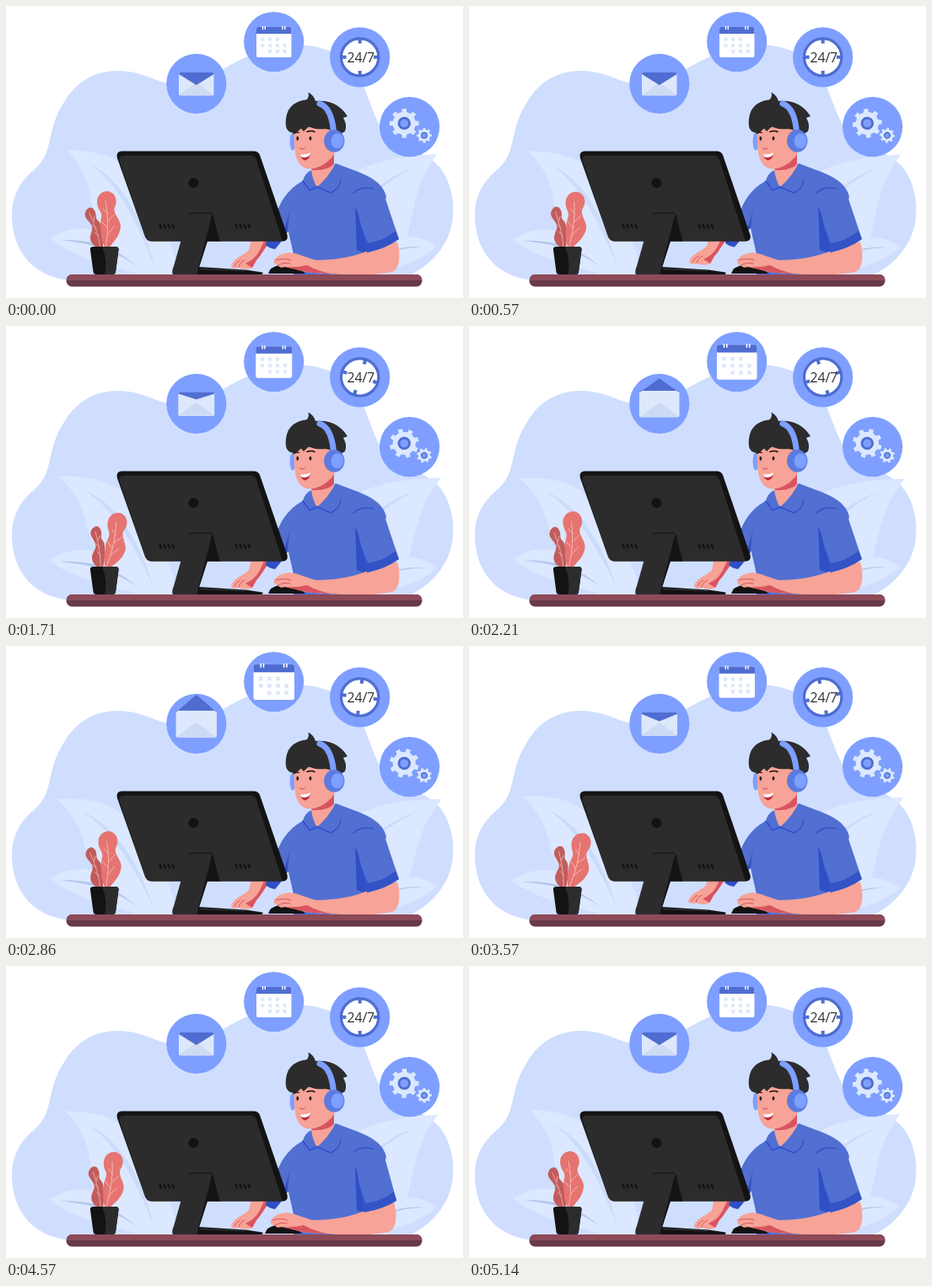
An HTML page for the animation above (5210 ms loop, 542 px wide and 347 px high).

```html
<!DOCTYPE html>
<html lang="en">
<head>
<meta charset="utf-8">
<style>
html, body { margin: 0; width: 100%; height: 100%; overflow: hidden; background: #fff }
svg { display: block; width: 100vw; height: 100vh }
.disc { fill: #7e9fff }
.pale { fill: #dbe8ff }
.blue { fill: #526fd2 }
.navy { fill: #2f4fc6 }
.skin { fill: #f7a397 }
.red { fill: #d9545f }
.dark { fill: #2c2c2c }
.black { fill: #131313 }
.line { fill: none; stroke-linecap: round; stroke-linejoin: round }
</style>
</head>
<body>
<svg viewBox="0 0 542 347">
  <path fill="#cfdeff" d="M75 326C40 322 9 300 7 252C6 222 20 206 35 193C58 172 46 150 69 114C83 90 105 77 133 77C165 77 178 93 205 93C238 93 258 70 300 54C340 40 385 45 408 70C427 90 432 125 446 146C475 172 507 175 520 200C533 224 534 255 522 279C510 301 492 316 468 324Z"/>

  <g id="leafL">
    <path class="pale" d="M72 171C105 172 130 178 148 196C175 225 195 270 205 320H160C125 295 105 260 100 225C97 205 88 188 72 171Z"/>
    <path fill="#cbdbfa" d="M100 188C135 206 160 245 176 310C155 255 133 212 100 188Z"/>
  </g>
  <g id="leafR">
    <path class="pale" d="M511 176C470 178 425 185 395 210L380 320H450C480 290 478 250 490 215C495 200 503 188 511 176Z"/>
    <path fill="#cbdbfa" d="M482 193C455 206 430 226 415 250C425 226 450 203 482 193Z"/>
  </g>
  <g id="lowL">
    <path class="pale" d="M52 276C75 262 95 262 115 270C140 280 155 300 160 320C125 308 80 300 52 276Z"/>
    <path fill="#b4c5ea" d="M64 278C100 277 130 286 156 310C128 289 100 282 64 278Z"/>
  </g>
  <g id="lowR">
    <path class="pale" d="M510 286C490 270 470 272 455 282L430 318C470 312 495 300 510 286Z"/>
    <path fill="#b4c5ea" d="M495 286C475 285 460 288 445 298C460 290 475 287 495 286Z"/>
  </g>

  <circle class="disc" cx="225.8" cy="92.3" r="35.6"/>
  <g id="mail">
    <rect x="205" y="79" width="41.5" height="27.5" rx="2" fill="#dde8fc"/>
    <path fill="#cddaf3" d="M205.5 106L224 92Q225.8 91 227.6 92L246 106Z"/>
    <path id="flap" fill="#4f6dd0"/>
  </g>

  <circle class="disc" cx="317.7" cy="42.5" r="35.6"/>
  <g id="calendar">
    <rect x="297" y="25" width="41.5" height="36" rx="2" fill="#fff"/>
    <path fill="#4f6dd0" d="M297 33V27Q297 25 299 25H336.5Q338.5 25 338.5 27V33Z"/>
    <path class="line" stroke="#fff" stroke-width="1.4" d="M304.5 24.5v3m2.8-3v3M328 24.5v3m2.8-3v3"/>
    <path id="days" fill="#dde7fc"/>
  </g>

  <circle class="disc" cx="419.7" cy="60.8" r="35.6"/>
  <circle cx="419.7" cy="60.8" r="22.2" fill="#fff" stroke="#4f6dd0" stroke-width="3.2"/>
  <path id="ticks" stroke="#4f6dd0" stroke-width="4" d="M419.7 38v6.6M419.7 77v6.6M397 60.8h6.6M436 60.8h6.6"/>
  <text x="420.8" y="66.6" text-anchor="middle" font-family="'Open Sans', sans-serif" font-size="16" font-weight="500" letter-spacing="-.2" fill="#303038">24/7</text>

  <circle class="disc" cx="478.6" cy="143.6" r="35.6"/>
  <g id="gearA"></g>
  <g id="gearB"></g>

  <!-- stand foot and far arm -->
  <path class="black" d="M228 310L284 313.5L304 316.5Q306 319 302 319H222Z"/>
  <path class="line" stroke="#444" stroke-width=".8" d="M230 312.5L283 314.5"/>
  <g id="farHand">
    <path class="skin" d="M292 272H316L312 282C306 288 303 296 297 302L292 311Q287 314 281 312Q279 313 277 311Q268 313 267 309Q268 304 275 299Q284 294 288 290Z"/>
    <path class="red" d="M316 272L312 282C306 288 303 296 297 302L292 311L284 306Q295 301 300 292L306 280Z"/>
    <path class="line" stroke="#d9545f" stroke-width="1" d="M276 310Q277 305 283 302M271 309Q273 304 278 302"/>
  </g>
  <path id="farSleeve" class="navy" d="M322 240L340 258Q330 277 319 289Q312 288 308 284Z"/>

  <!-- torso -->
  <path class="blue" d="M356 206C340 213 329 225 322 243L330 264L334 264L341 295V320H431L432 290L451 227C448 211 432 202 412 195L391 187L368 214Z"/>
  <path class="navy" d="M337 236Q336 250 329 268L334 264Z"/>
  <path class="navy" d="M414 238L416 290L427 294L432 290L431 280Z"/>

  <!-- neck, head, hair -->
  <path class="skin" d="M364 188L389 174V191L373 216Q365 212 361 201Z"/>
  <path class="red" d="M362 193Q380 190 389 175V188Q381 196 363 195Z"/>
  <path class="blue" d="M362 195Q354 199 352 208L360 219L369 215Q364 208 362 195ZM391 187L398 207L386 222Q377 219 369 215Q383 203 391 187Z"/>
  <path class="line" stroke="#2f4fc6" stroke-width="1.4" d="M352 208L360 219L369 215L385 222Q396 217 397 207"/>
  <ellipse cx="340" cy="161" rx="3.4" ry="10.5" class="disc"/>
  <path class="skin" d="M341 140L342 166C343 180 347 192 358 193.5C370 194 382 187 390 175L388 135L355 130Z"/>
  <path class="dark" d="M342 151Q333 150 332 143C331 130 334 114 356 111.5Q360 109 358.500 102.500Q365 106 367 113C384 111 397 118 405 131L400 133Q405 141 402 149L397 152L389 162L384 147L378 146Q367 147 359 143.500Q356 146 353 149L350 145.500Q347 149 342 151Z"/>
  <path class="line" stroke="#111" stroke-width="1.5" d="M341.5 151.5Q344 149 347 150.4M357 149.5Q362 147.5 366 149.5"/>
  <ellipse cx="345.8" cy="157.5" rx="1.4" ry="2.4" fill="#1b1b1b"/>
  <ellipse cx="361" cy="157.3" rx="1.4" ry="2.4" fill="#1b1b1b"/>
  <path class="line" stroke="#d9545f" stroke-width="1.2" d="M349 169Q351 171 354 169"/>
  <path fill="#b92f3c" d="M348.5 176Q355 177 361 174Q361 182 355 183.5Q350 183 348.5 176Z"/>
  <path fill="#fff" d="M348.8 176Q355 177 361 174Q361 178 358 179Q353 181 349.7 179Z"/>
  <path class="line" stroke="#7e9fff" stroke-width="7" stroke-linecap="butt" d="M372 116Q386 121 388.500 149"/>
  <ellipse cx="389.3" cy="160.3" rx="12.2" ry="13.3" fill="#5b7be0"/>
  <ellipse cx="393" cy="160.3" rx="7.5" ry="9" class="disc"/>

  <!-- near arm and mouse -->
  <g id="nearArm">
    <path class="black" d="M311 318Q313 310 324 308Q345 308 355 318Z"/>
    <path class="skin" d="M464 280C468 294 468 312 458 316C440 320 410 320 380 318Q355 317 346 313.500L331 310Q324 312 323 308Q317 308 318 302Q323 294 336 293Q346 294 352 297L367 302Q405 302 431 290Z"/>
    <path class="red" d="M331 310Q345 311 357 308Q367 314 385 318Q355 317 346 313.500Z"/>
    <path class="line" stroke="#d9545f" stroke-width="1" d="M320 302Q330 299 338 302M323 308Q330 304 337 306"/>
  </g>
  <g id="nearSleeve">
    <path class="blue" d="M412 220C425 206 445 213 450 229L466 277Q451 288 428 293Z"/>
    <path class="navy" d="M414 242L428 293Q451 288 466 277L462 267Q448 279 429 282Z" opacity=".85"/>
    <path class="line" stroke="#2f4fc6" stroke-width="1.3" d="M412 222Q421 214 435 217"/>
  </g>

  <!-- monitor -->
  <path class="black" d="M137 172.5H294Q299 172.5 301 177L333.5 272Q335 278.5 329 279.5H172Q167 279 165 274L132 181Q130 173 137 172.5Z"/>
  <path class="dark" d="M140 177.5H290Q295 177.5 297 183L328 279.5H172Q167 279 165 274L134.500 184Q133 178 140 177.500Z"/>
  <circle class="black" cx="222.4" cy="210.2" r="6"/>
  <path id="vents" class="line" stroke="#131313" stroke-width="2.3"/>
  <path class="black" d="M239 247H245L253.500 279.500H239L229 311L226 319H220Z"/>
  <path class="dark" d="M220 246H245L226 319H198Q196 316 199 309L216 249Q217 246 220 246Z"/>
  <path class="line" stroke="#131313" stroke-width="1" d="M217 248Q218 246 222 246H244"/>

  <!-- desk and plant -->
  <rect x="71.500" y="319" width="422" height="14.500" rx="7" fill="#673a4b"/>
  <path fill="#8d4a58" d="M72 326Q72 319 78.500 319H486.500Q493 319 493.500 326Z"/>
  <g id="leafDark">
    <path fill="#c25c5c" d="M111 288C104 286 99 280 100 274C101 267 104 265 101 260C98 254 92 252 94 245C96 239 102 237 105 243C108 248 105 251 109 255C114 259 113 266 115 275V288Z"/>
    <path class="line" stroke="#efaaa5" stroke-width=".9" d="M112 287Q109 268 99 246M104 256l1-6M107 264l-5-4M110 273l-5-4"/>
  </g>
  <g id="leafPink">
    <path fill="#e67471" d="M118 288C112 278 113 268 112 262C111 254 116 250 111 243C105 233 108 221 120 220C130 221 133 232 129 239C126 247 136 253 136 262C135 275 126 281 122 288Z"/>
    <path class="line" stroke="#f5bab4" stroke-width=".9" d="M118.500 287Q123 255 118 232M121 247l-6-6M121 256l7-8M121 264l-8-8M120 272l8-10"/>
  </g>
  <path class="black" d="M100 290Q99 286 104 286H130Q134 286 133.500 290L130 316Q129.500 319 127 319H107Q104 319 103.500 316Z"/>
  <path class="dark" d="M114 286H130Q134 286 133.500 290L130 316Q129.500 319 127 319H117Q121 303 114 286Z"/>
</svg>
<script>
const LOOP = 5210, HALF = LOOP / 2;
const el = id => document.getElementById(id);
const set = (id, transform) => el(id).setAttribute('transform', transform);
const turn = (id, angle, x, y) => set(id, `rotate(${angle} ${x} ${y})`);
const shift = (id, x, y = 0) => set(id, `translate(${x} ${y})`);
const zoom = (id, s, x, y) => set(id, `translate(${x} ${y}) scale(${s}) translate(${-x} ${-y})`);
const clamp = p => Math.min(1, Math.max(0, p));
const ease = p => p < .5 ? 2 * p * p : 1 - 2 * (1 - p) ** 2;
const wave = (t, period) => (1 - Math.cos(2 * Math.PI * t / period)) / 2;
const bump = (t, from, to) => Math.sin(Math.PI * clamp((t - from) / (to - from))) ** 2;

const rows = [[0, 1, 2], [0, 1, 2, 3], [1, 2, 3]];
el('days').setAttribute('d', rows.map((cols, r) =>
  cols.map(c => `M${302.5 + c * 8.7} ${37.5 + r * 7.2}h4v4h-4z`).join('')).join(''));
el('vents').setAttribute('d', [182.5, 272.5].map(x =>
  [0, 1, 2, 3].map(i => `M${x + i * 5} 259.500l1.500 4`).join('')).join(''));

function gear(id, x, y, r) {
  const tooth = [[-.36, .77], [-.2, .79], [-.15, 1], [.15, 1], [.2, .79], [.36, .77]];
  const points = [];
  for (let i = 0; i < 8; i++) {
    for (const [offset, k] of tooth) {
      const angle = i * Math.PI / 4 + offset;
      points.push([x + r * k * Math.cos(angle), y + r * k * Math.sin(angle)]);
    }
  }
  el(id).innerHTML = `<polygon class="pale" points="${points.join(' ')}"/>
    <circle cx="${x}" cy="${y}" r="${r * .36}" fill="#7e9fff" stroke="#4f6dd0" stroke-width="${r * .16}"/>`;
}
gear('gearA', 472.3, 139.4, 17.5);
gear('gearB', 496, 153.8, 9);

function draw(now) {
  const t = now % LOOP;
  const slow = wave(t, LOOP), quick = wave(t, HALF);

  turn('leafL', -5 * slow, 190, 320);
  turn('leafR', 2.4 * slow, 370, 320);
  turn('lowL', -1.6 * quick, 160, 320);
  turn('lowR', 1.6 * quick, 430, 318);
  turn('leafPink', 17 * quick, 118, 288);
  turn('leafDark', 12 * quick, 113, 288);

  // the icons act during the middle half of the loop
  const rise = ease(clamp((t - LOOP / 4) / (LOOP / 4)));
  const fall = ease(clamp((t - HALF) / (LOOP / 4)));
  const open = rise - fall;
  zoom('mail', 1 + .18 * open, 225.8, 92.5);
  zoom('calendar', 1 + .18 * open, 317.8, 43);
  el('flap').setAttribute('d', `M205 81Q205 79 207 79H244.500Q246.500 79 246.500 81L225.800 ${94 - 34 * open}Z`);
  turn('ticks', 90 * (rise + fall), 419.7, 60.8);

  const spin = 360 * t / LOOP;
  turn('gearA', spin, 472.3, 139.4);
  turn('gearB', -spin, 496, 153.8);

  const tap = bump(t, 0, 900) + bump(t, 2930, 4100);
  shift('farHand', -7 * tap, -6 * tap);
  shift('farSleeve', -5 * tap, -3 * tap);
  const slide = bump(t, 620, 1620) + bump(t, 3900, 5140);
  shift('nearArm', -4 * slide);
  turn('nearSleeve', 3 * slide, 430, 225);

  requestAnimationFrame(() => draw(performance.now()));
}
draw(performance.now());
</script>
</body>
</html>
```
